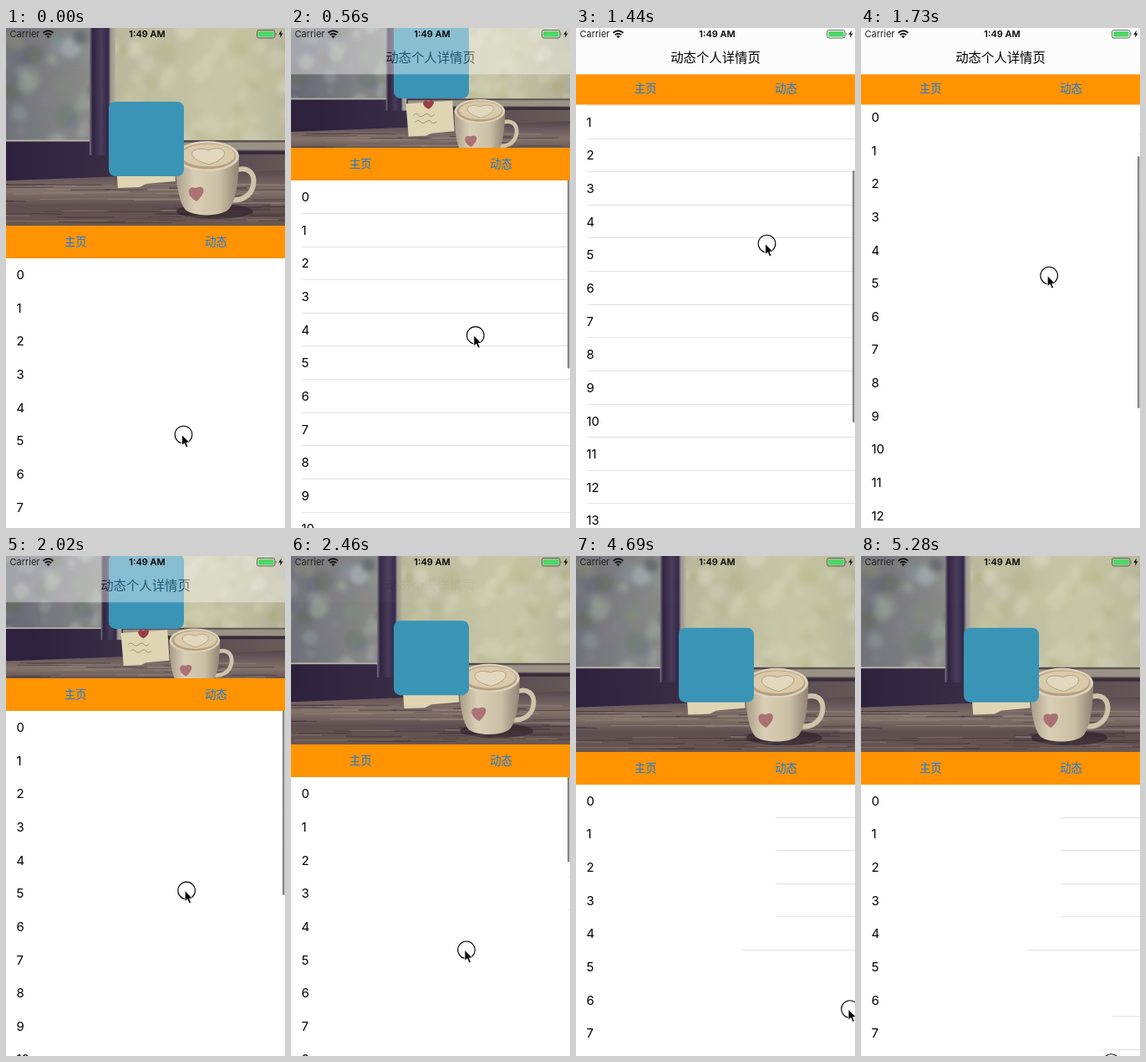
An HTML page for the animation above (5.44 s loop, 334 px wide and 597 px high).

```html
<!DOCTYPE html>
<html lang="zh">
<head>
<meta charset="utf-8">
<title>Profile page</title>
<style>
html, body { margin: 0; width: 100%; height: 100%; overflow: hidden; background: #fff; }
svg { display: block; width: 100vw; height: 100vh; }
text { font-family: Inter, "Noto Sans CJK SC", "Noto Sans CJK", sans-serif; }
.cjk { font-family: "Noto Sans CJK SC", "Noto Sans CJK", sans-serif; text-anchor: middle; }
.tab { font-size: 13.3px; fill: #147ae6; }
.row { font-size: 15px; fill: #000; }
</style>
</head>
<body>
<svg viewBox="0 0 334 597" xmlns="http://www.w3.org/2000/svg">
  <defs>
    <clipPath id="photoClip"><rect id="photoBox" width="334" height="236"/></clipPath>
    <clipPath id="panes"><path d="M-44 0H101V134H-44ZM131 0H378V136H131Z"/></clipPath>
    <filter id="soft" x="-10%" y="-10%" width="120%" height="120%"><feGaussianBlur stdDeviation="3"/></filter>
    <linearGradient id="glass" x2="1" y2="0">
      <stop offset="0" stop-color="#676775"/><stop offset=".34" stop-color="#8a8a88"/>
      <stop offset=".42" stop-color="#b9b89c"/><stop offset=".75" stop-color="#c8c7a6"/>
      <stop offset="1" stop-color="#b0ad96"/>
    </linearGradient>
    <linearGradient id="frame" x2="1" y2="0">
      <stop offset="0" stop-color="#7b7684"/><stop offset=".12" stop-color="#2f2440"/>
      <stop offset=".45" stop-color="#493c5a"/><stop offset=".72" stop-color="#33284a"/>
      <stop offset=".82" stop-color="#9c968f"/><stop offset="1" stop-color="#b3ae98"/>
    </linearGradient>
    <linearGradient id="sill" x2="1" y2="0">
      <stop offset=".1" stop-color="#2d213d"/><stop offset=".45" stop-color="#3b2f46"/>
      <stop offset=".7" stop-color="#5a4d52"/><stop offset="1" stop-color="#6a5c58"/>
    </linearGradient>
    <linearGradient id="wood" x2="0" y2="1">
      <stop offset="0" stop-color="#54464e"/><stop offset=".4" stop-color="#84736b"/>
      <stop offset=".65" stop-color="#5f4e50"/><stop offset="1" stop-color="#6a5852"/>
    </linearGradient>
    <linearGradient id="china" x2="1" y2="0">
      <stop offset="0" stop-color="#a99c88"/><stop offset=".3" stop-color="#d9cfb5"/>
      <stop offset=".7" stop-color="#cabea4"/><stop offset="1" stop-color="#908372"/>
    </linearGradient>
  </defs>

  <rect width="334" height="597" fill="#fff"/>
  <g id="rows"></g>
  <rect id="thumb" x="331" width="2.5" height="301" rx="1.2" fill="#868686"/>

  <g clip-path="url(#photoClip)">
    <g id="photo">
      <rect x="-44" width="422" height="236" fill="url(#glass)"/>
      <g clip-path="url(#panes)"><g id="bokeh" filter="url(#soft)"></g></g>
      <rect x="-44" y="134" width="422" height="50" fill="url(#sill)"/>
      <path d="M-44 134.5H101" stroke="#b7b2a8" stroke-width="2"/>
      <path d="M133 141H378" stroke="#9a9285" stroke-width="9"/>
      <path d="M133 149H378" stroke="#382c3b" stroke-width="4"/>
      <rect x="100" width="31" height="152" fill="url(#frame)"/>
      <path d="M-44 184L378 168V236H-44Z" fill="url(#wood)"/>
      <g id="grain" fill="none"></g>
      <path d="M130 142L200 137L203 183L168 186L160 190L134 191Z" fill="#dfd5b2"/>
      <path d="M141 159q5-4 8 0t8 0t8 0t8-1M144 169q5-4 8 0t8 0t8 0t8 0" fill="none" stroke="#8f7d62"/>
      <path d="M164 150C150 142 157 133 164 139C171 132 178 141 164 150Z" fill="#9c3d47"/>
      <ellipse cx="250" cy="219" rx="46" ry="9" fill="#2c1f28" opacity=".6"/>
      <path d="M273 171C288 164 299 172 296 188C293 202 280 207 268 205" fill="none" stroke="#cfc4aa" stroke-width="6"/>
      <path d="M203 152C202 180 207 207 214 216C222 226 260 226 268 215C276 203 279 180 279 152Z" fill="url(#china)"/>
      <ellipse cx="241" cy="153" rx="38" ry="18" fill="#dcd2b9"/>
      <ellipse cx="241" cy="153" rx="34.5" ry="15.5" fill="#b59f7f"/>
      <ellipse cx="242" cy="152" rx="32" ry="13.5" fill="#d8caaa"/>
      <path d="M243 163C209 154 224 139 242 146C261 138 274 153 243 163Z" fill="#e2d8bd" stroke="#b39d7c"/>
      <path d="M228 207C214 199 218 187 227 191C238 186 241 196 228 207Z" fill="#ab7274"/>
    </g>
    <rect id="icon" x="123" width="90" height="89" rx="8" fill="#3a94b6"/>
  </g>

  <g id="bar">
    <rect width="334" height="39" fill="#ff9300"/>
    <text class="cjk tab" x="83.3" y="24.2">主页</text>
    <text class="cjk tab" x="251.5" y="24.2">动态</text>
  </g>
  <g id="nav">
    <rect width="334" height="55.3" fill="#fcfcfc"/>
    <text class="cjk" x="167" y="41.4" font-size="15.4">动态个人详情页</text>
  </g>

  <g id="status">
    <text x="4.5" y="11" font-size="11" fill="#222">Carrier</text>
    <path d="M44.5 5.8Q50.5 .8 56.5 5.8M46.7 8.3Q50.5 5 54.3 8.3" fill="none" stroke="#111" stroke-width="1.9"/>
    <path d="M48.3 9.8Q50.5 8 52.7 9.8L50.5 12.2Z" fill="#111"/>
    <text x="169" y="11" font-size="11" font-weight="600" text-anchor="middle">1:49 AM</text>
    <rect x="300.5" y="2.5" width="21.5" height="9.5" rx="2.3" fill="none" stroke="#555" stroke-width=".9"/>
    <rect x="302" y="4" width="18.5" height="6.5" rx="1" fill="#4cd964"/>
    <path d="M323.2 5.5Q324.8 7.2 323.2 9Z" fill="#555"/>
    <path d="M329.8 2.8L326.3 7.8H328.6L327.8 11.8L331.6 6.4H329.2Z" fill="#111"/>
  </g>

  <g id="cursor">
    <circle r="10.3" fill="none" stroke="#000" stroke-width="1.1"/>
    <path d="M-2 0V13.2L1 10.4L3.2 15.4L5.5 14.4L3.4 9.6H7.4Z" fill="#000" stroke="#fff" stroke-width=".9"/>
  </g>
</svg>
<script>
const LOOP = 5440, STEP = 145.5, ROW = 39.63;
const TOP = 236, END = 14, REST = 233.63, PIN = 52.5;
const DRAG = 412, BACK = 1650, LEAVE = 3050, GONE = 3486, ENTER = 4690;

const $ = id => document.getElementById(id);
const set = (el, attrs) => { for (const k in attrs) el.setAttribute(k, attrs[k]); return el; };
const add = (parent, tag, attrs) =>
  parent.appendChild(set(document.createElementNS("http://www.w3.org/2000/svg", tag), attrs));

const clamp = u => Math.min(1, Math.max(0, u));
const mix = (a, b, u) => a + (b - a) * u;
const glide = (t, from, to, power) => 1 - (1 - clamp((t - from) / (to - from))) ** power;

let seed = 11;
const rnd = (lo, hi) => lo + (hi - lo) * (seed = seed * 16807 % 2147483647) / 2147483647;

// The screen refreshes in even steps within each burst of motion.
function refresh(t) {
  const from = [ENTER, LEAVE, DRAG, 0].find(s => t >= s);
  return from + Math.floor((t - from) / STEP) * STEP;
}

function scrollAt(t) {
  const up = mix(TOP, END, glide(t, 340, 1430, 2.44));
  return mix(up, REST, glide(t, 1640, 2640, 1.97));
}

function pointerAt(t) {
  let x = 212.5, y = 485.5;
  const go = (toX, toY, u) => { x = mix(x, toX, u); y = mix(y, toY, u); };
  go(228.5, 257.5, glide(t, 340, 1430, 3.3));
  go(209.5, 475.5, glide(t, 1640, 2640, 2.26));
  go(325, 235, glide(t, 2900, 3341, 1));
  go(328, 541, glide(t, GONE, ENTER, 1));
  go(299.5, 605, glide(t, ENTER, 5270, 1.5));
  return [x, y];
}

// Left end of the divider below row i; 334 hides it.
function lineStart(i, t) {
  if (t >= DRAG && t < BACK) return 13;
  if (t >= BACK && t < LEAVE) return i < 4 ? 332 : 334;
  const swept = [239, 239, 239, 239, 199, 334, 301, 289][i] || 334;
  return t >= (i < 5 ? LEAVE : ENTER + 2 * STEP) ? swept : 334;
}

for (let i = 0; i < 130; i++) {
  const x = rnd(-44, 378), left = x < 115;
  add($("bokeh"), "circle", {
    cx: x, cy: rnd(0, 140), r: rnd(5, 14), opacity: rnd(0.25, 0.6),
    fill: left ? `hsl(${rnd(60, 240)} 9% ${rnd(32, 72)}%)` : `hsl(58 24% ${rnd(56, 84)}%)`
  });
}
for (let i = 0; i < 60; i++) {
  const w = rnd(30, 140);
  add($("grain"), "path", {
    d: `M${rnd(-50, 350)} ${rnd(185, 235)}q${w / 2} ${rnd(-1.5, 1.5)} ${w} 0`,
    stroke: rnd(0, 1) < 0.55 ? "#3a2c34" : "#a08f83", "stroke-width": rnd(0.6, 1.8), opacity: 0.5
  });
}

const rows = Array.from({ length: 16 }, (_, i) => {
  const label = add($("rows"), "text", { class: "row", x: 12.5 });
  label.textContent = i;
  return { label, line: add($("rows"), "rect", { height: 1, fill: "#e2e2e5" }) };
});

function draw(t) {
  const y = scrollAt(t), h = Math.max(PIN, Math.round(y));
  const size = Math.max(h, 334 * 9 / 16) / TOP;
  const [px, py] = pointerAt(t);

  set($("photoBox"), { height: h });
  set($("photo"), { transform: `translate(167 ${h / 2}) scale(${size}) translate(-167 -118)` });
  set($("icon"), { y: y - 148 });
  set($("bar"), { transform: `translate(0 ${h})` });
  set($("nav"), { opacity: clamp((TOP - y) / (TOP - PIN)) ** 1.3 });

  rows.forEach(({ label, line }, i) => {
    const mid = y + 58.7 + ROW * i, x = lineStart(i, t);
    set(label, { y: mid + 5.5 });
    set(line, { x, y: Math.floor(mid + ROW / 2 - 0.1), width: 334 - x });
  });

  set($("thumb"), { y: 177 - y / 2, opacity: t < DRAG ? 0 : 1 - clamp((t - 2600) / 280) });
  set($("cursor"), {
    transform: `translate(${px} ${py})`,
    visibility: t >= GONE && t < ENTER ? "hidden" : "visible"
  });
}

let shown = -1;
const start = performance.now();
function loop() {
  const t = refresh((performance.now() - start) % LOOP);
  if (t !== shown) draw(shown = t);
  requestAnimationFrame(loop);
}
loop();
</script>
</body>
</html>
```
